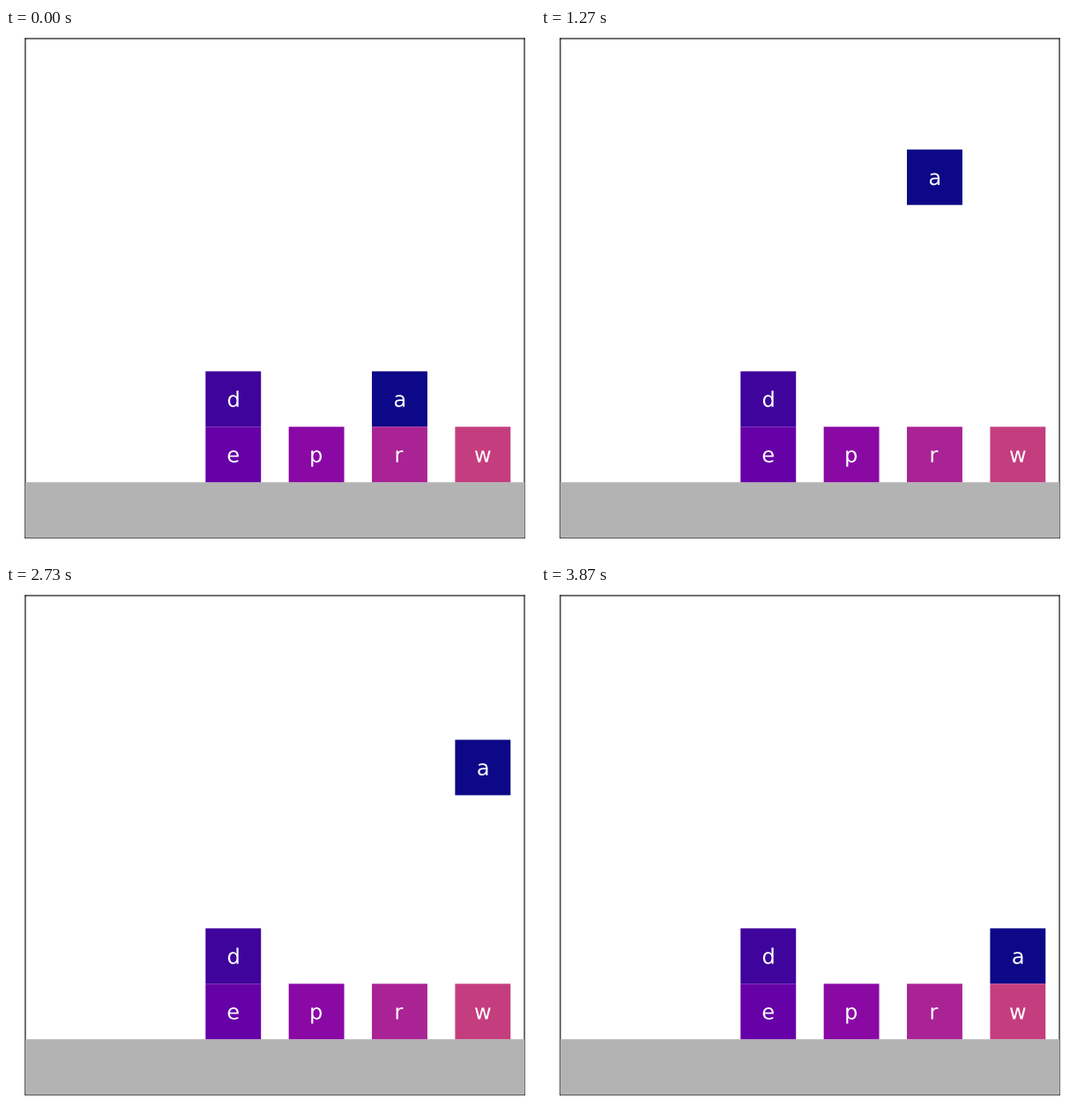
A matplotlib script for the animation above (3940 ms loop, 600 px wide and 600 px high).

```python
import matplotlib.pyplot as plt
from matplotlib.animation import FuncAnimation
from matplotlib.patches import PathPatch, Rectangle
from matplotlib.textpath import TextPath
from matplotlib.transforms import Affine2D

SIZE, DPI = 600, 100
LOOP_MS, TICK_MS = 3940, 10
FPS = 15
LEFT, UNIT, SPAN = 21.9, 62.9, 9   # axes origin and block size in pixels
EM = 24                            # letter size in pixels
CAP = 0.729                        # cap height of the font in ems
COLUMN = [3.25, 4.75, 6.25, 7.75]
BLOCKS = [("a", 2, 2), ("d", 0, 2), ("e", 0, 1),
          ("p", 1, 1), ("r", 2, 1), ("w", 3, 1)]

plt.rcParams["font.family"] = "DejaVu Sans"
fig = plt.figure(figsize=(SIZE / DPI, SIZE / DPI), dpi=DPI, facecolor="white")
side = SPAN * UNIT / SIZE
ax = fig.add_axes([LEFT / SIZE, LEFT / SIZE, side, side])
ax.set(xlim=(0, SPAN), ylim=(0, SPAN), xticks=[], yticks=[])
for spine in ax.spines.values():
    spine.set_snap(False)


def add_rect(w, color):
    # Shapes lie above the frame and cover its inner half.
    rect = Rectangle((0, 0), w, 1, facecolor=color, linewidth=0,
                     snap=False, zorder=3)
    return ax.add_patch(rect)


def letter_path(letter):
    """Outline in block units, centred by its ink width and the cap height."""
    path = TextPath((0, 0), letter, size=EM / UNIT)
    box = path.get_extents()
    shift = Affine2D().translate(0.5 - (box.x0 + box.x1) / 2,
                                 0.5 - CAP * EM / UNIT / 2)
    return shift.transform_path(path)


def add_block(letter, color):
    glyph = PathPatch(letter_path(letter), facecolor="white", linewidth=0,
                      snap=False, zorder=4)
    return add_rect(1, color), ax.add_patch(glyph)


def place(block, x, y):
    move = Affine2D().translate(x, y) + ax.transData
    for part in block:
        part.set_transform(move)


add_rect(SPAN, "0.7")
plasma = plt.get_cmap("plasma")
blocks = {}
for i, (name, col, row) in enumerate(BLOCKS):
    blocks[name] = add_block(name, plasma(24 * i))
    place(blocks[name], COLUMN[col], row)


def position(step):
    """Lift, pause, carry across, lower; lift and carry open with a double step."""
    lift = min(step + 1, 20) / 20 if step > 0 else 0
    carry = min(step - 28, 10) / 10 if step >= 30 else 0
    lower = min(max(step - 38, 0), 20) / 20
    x = COLUMN[2] + carry * (COLUMN[3] - COLUMN[2])
    return x, 2 + 4 * (lift - lower)


def step_at(ms):
    """Index of the latest 15 fps step, with starts rounded to 10 ms."""
    step = int(ms * FPS / 1000) + 1
    while round(step * 100 / FPS) * 10 > ms:
        step -= 1
    return step


def update(tick):
    place(blocks["a"], *position(step_at(tick * TICK_MS)))
    return blocks["a"]


anim = FuncAnimation(fig, update, frames=LOOP_MS // TICK_MS,
                     interval=TICK_MS, repeat=True, repeat_delay=0)
plt.show()
```
